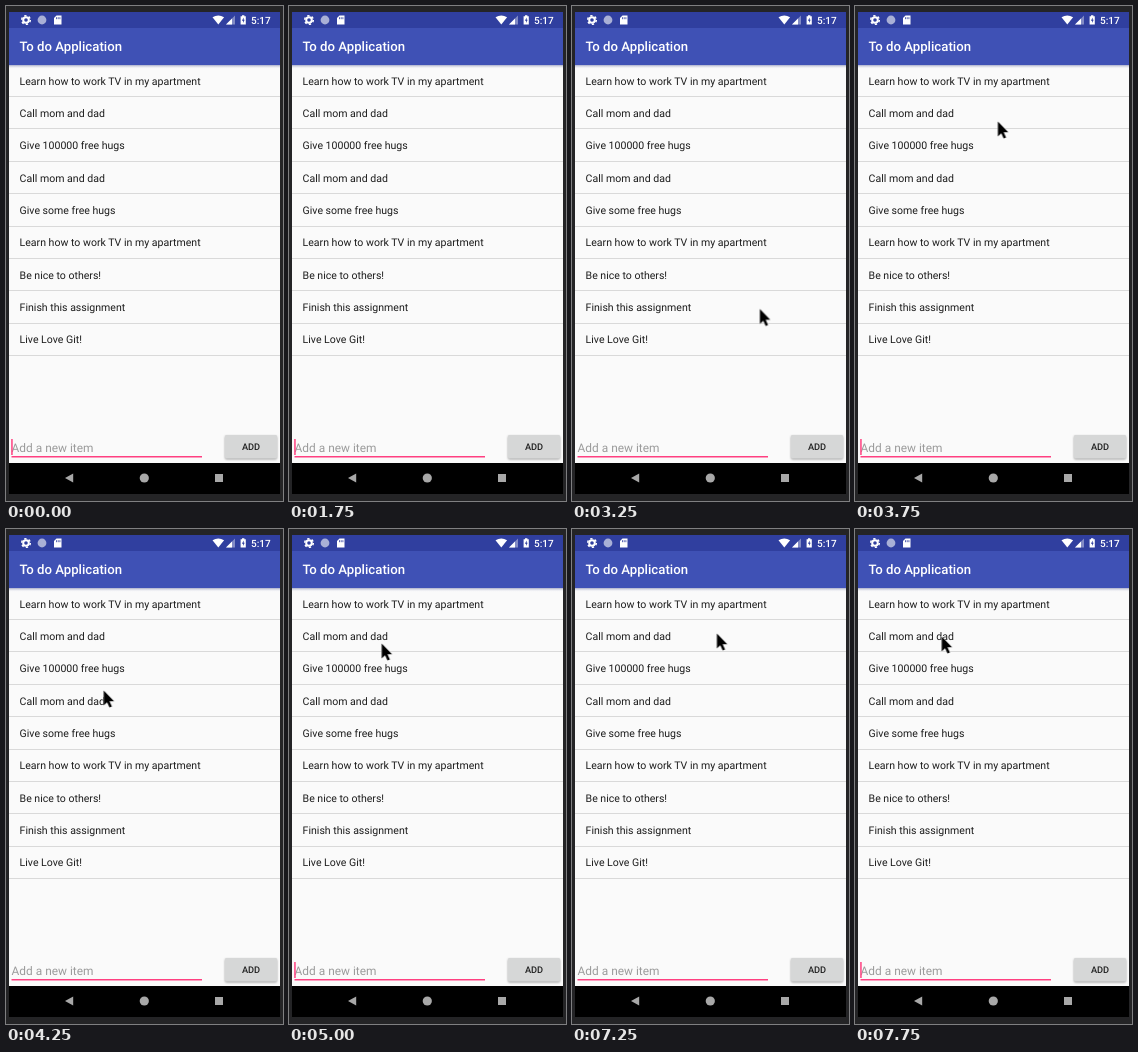
An HTML page that plays this animation: 277x495 px, repeating every 8 s.

```html
<!DOCTYPE html>
<html lang="en">
<head>
<meta charset="utf-8">
<title>To do list</title>
<style>
  html, body { margin: 0; width: 100%; height: 100%; overflow: hidden; background: #242426; }
  svg { display: block; width: 277px; height: 495px; }
  text { font-family: Roboto, "Liberation Sans", sans-serif; text-rendering: geometricPrecision; }
  .title { font-size: 13.2px; font-weight: 500; fill: #fff; }
  .clock { font-size: 10px; font-weight: 500; fill: #fff; }
  .items text { font-size: 10.55px; fill: #1c1c1c; }
  .items path { stroke: #d9d9d9; }
  .hint { font-size: 11.9px; fill: #9b9b9b; }
  .label { font-size: 9.25px; font-weight: 500; fill: #202020; text-anchor: middle; }
  .button { fill: #d6d7d7; filter: drop-shadow(0 1px 1px rgba(0, 0, 0, .35)); }

  .caret { fill: #ff4081; animation: blink 1s step-end infinite; }
  @keyframes blink {
    0% { opacity: 1; }
    25% { opacity: 0; }
    75%, 100% { opacity: 1; }
  }

  /* The pointer jumps between sampled positions. */
  .pointer { animation: roam 8s step-end infinite; }
  @keyframes roam {
    0% { opacity: 0; transform: translate(210px, 291px); }
    31.25% { opacity: 1; transform: translate(210px, 291px); }
    34.375% { opacity: 1; transform: translate(187.5px, 302.5px); }
    46.875% { transform: translate(142.5px, 115px); }
    50% { transform: translate(144.5px, 107px); }
    53.125% { transform: translate(97.3px, 161px); }
    56.25% { transform: translate(93px, 127.5px); }
    59.375% { transform: translate(90.5px, 118px); }
    62.5% { transform: translate(92.3px, 114px); }
    87.5% { transform: translate(145px, 101.5px); }
    90.625% { transform: translate(144.5px, 104px); }
    93.75% { transform: translate(95.5px, 110px); }
    96.875%, 100% { opacity: 1; transform: translate(86.3px, 107px); }
  }
</style>
</head>
<body>
<svg viewBox="0 0 277 495">
  <defs>
    <linearGradient id="shade" x2="0" y2="1">
      <stop stop-color="#8c92b8" stop-opacity=".75"/>
      <stop offset="1" stop-color="#fafafa" stop-opacity="0"/>
    </linearGradient>
  </defs>
  <rect width="277" height="495" fill="#242426"/>
  <rect x="3" y="6" width="271" height="482" fill="#fafafa"/>

  <!-- bars -->
  <rect x="3" y="6" width="271" height="16" fill="#303f9f"/>
  <rect x="3" y="22" width="271" height="37" fill="#3f51b5"/>
  <rect x="3" y="59" width="271" height="4" fill="url(#shade)"/>
  <text class="title" x="13.6" y="45.4">To do Application</text>

  <!-- status icons -->
  <g fill="#fff">
    <circle cx="20" cy="14" r="2.8" fill="none" stroke="#fff" stroke-width="2"/>
    <circle cx="20" cy="14" r="4.3" fill="none" stroke="#fff" stroke-width="1.5" stroke-dasharray="2.25"/>
    <circle cx="36" cy="14" r="4.4" fill="#a9b0d6"/>
    <path d="M50.5 9.5H55.5V18.5H48V12Z"/>
    <path d="M50.5 11.2v2M52.2 11.2v2M53.9 11.2v2" stroke="#303f9f" stroke-width=".8"/>
    <path d="M206.5 11.3Q212.3 7.7 218.1 11.3L212.3 18.5Z"/>
    <path d="M229 9.5V18.5H220Z" opacity=".4"/>
    <path d="M226 12.5V18.5H220Z"/>
    <path d="M236 9.2h2.4v1h1.4v8.3h-5.2v-8.3h1.4Z"/>
    <path d="M237.7 11.5l-1.8 3.2h1.2v2.3l1.6-3.2h-1Z" fill="#303f9f"/>
  </g>
  <text class="clock" x="245" y="17.6">5:17</text>

  <g class="items" id="items"></g>

  <!-- entry row -->
  <text class="hint" x="5.6" y="446">Add a new item</text>
  <rect x="5.5" y="450" width="190.5" height="1.5" fill="#ff4081"/>
  <rect class="caret" x="5.2" y="433" width="1.5" height="16"/>
  <rect class="button" x="219" y="429" width="52" height="23.5" rx="1.4"/>
  <text class="label" x="245" y="444.2">ADD</text>

  <!-- navigation -->
  <rect x="3" y="457" width="271" height="31" fill="#000"/>
  <g fill="#a8a8a8">
    <path d="M59 472L67.2 467.5V476.5Z"/>
    <circle cx="138.3" cy="472" r="4.6"/>
    <rect x="209" y="468" width="8" height="8"/>
  </g>

  <path class="pointer" d="M.4 .4V15.4L3.8 12.2 6.2 17.6 8.6 16.6 6.2 11.3H10.8Z"
        fill="#000" stroke="#fff" stroke-width=".9" paint-order="stroke"/>
</svg>
<script>
  const tasks = [
    "Learn how to work TV in my apartment",
    "Call mom and dad",
    "Give 100000 free hugs",
    "Call mom and dad",
    "Give some free hugs",
    "Learn how to work TV in my apartment",
    "Be nice to others!",
    "Finish this assignment",
    "Live Love Git!"
  ];
  const pitch = 32.36;
  document.getElementById("items").innerHTML = tasks.map((task, i) => {
    const y = i * pitch;
    const line = Math.floor(90.6 + y) + 0.5;
    return `<text x="13.6" y="${78.6 + y}">${task}</text><path d="M3 ${line}H274"/>`;
  }).join("");
</script>
</body>
</html>
```
